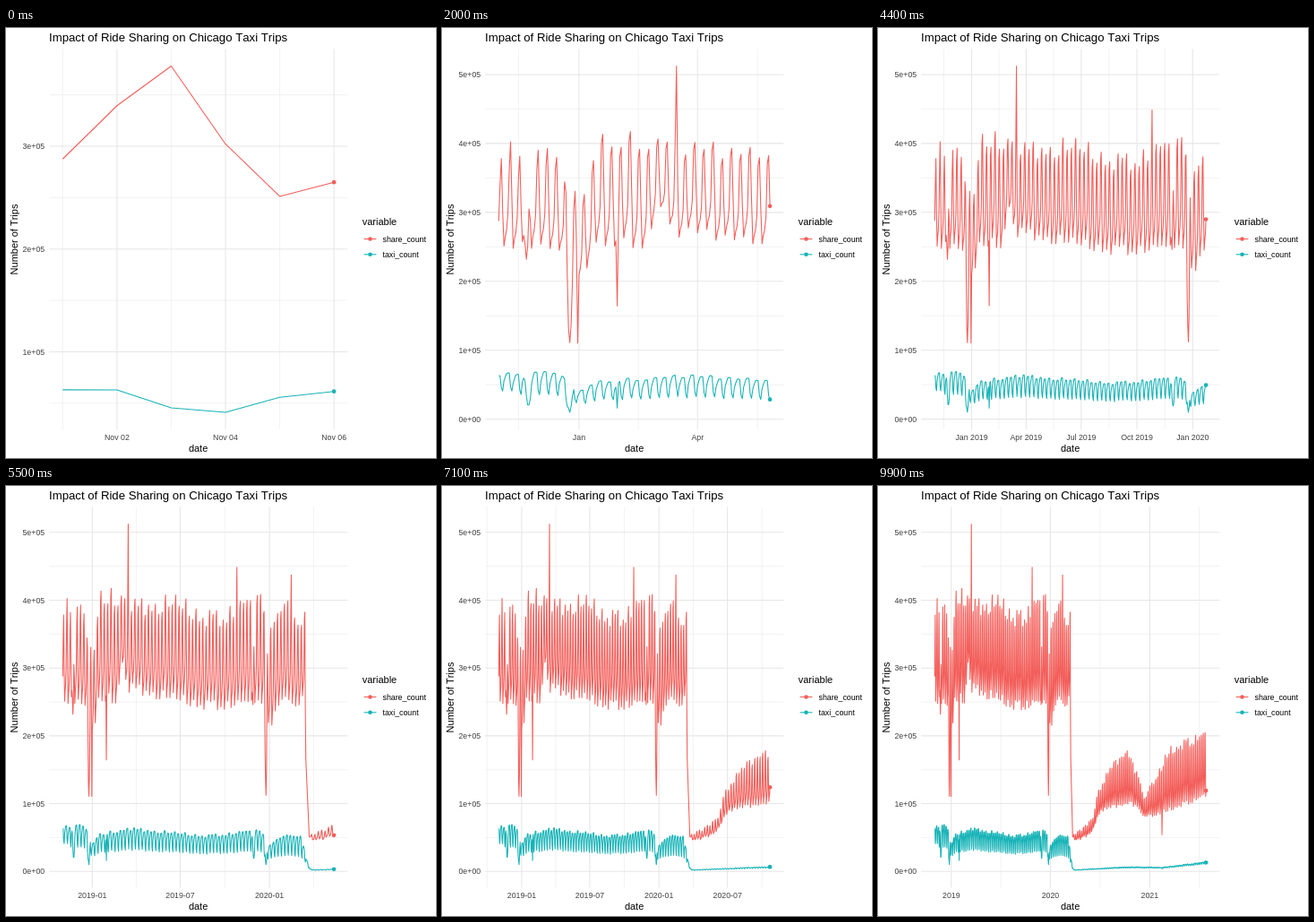
Recreate the animation shown at these times as an HTML page. Size 480 by 480 pixels, loop 10 s.

```html
<!DOCTYPE html>
<html lang="en">
<head>
<meta charset="utf-8">
<title>Ride sharing and taxi trips</title>
<style>
  html, body { margin: 0; width: 100%; height: 100%; overflow: hidden; background: #fff; }
  svg { display: block; width: 480px; height: 480px; }
  text { font: 11px "Liberation Sans", Arial, sans-serif; font-kerning: none; }
  .title { font-size: 13.2px; }
  .small, .tick { font-size: 8.8px; }
  .tick { fill: #404040; }
  .mid { text-anchor: middle; }
  .end { text-anchor: end; }
  .major, .minor { stroke: #e6e6e6; fill: none; stroke-width: 1.07; }
  .minor { stroke-width: .53; }
  .line { fill: none; stroke-width: 1.07; stroke-linejoin: round; }
  .share { stroke: #f35e5a; }
  .taxi { stroke: #17b3b7; }
  circle.share { fill: #f35e5a; stroke: none; }
  circle.taxi { fill: #17b3b7; stroke: none; }
</style>
</head>
<body>
<svg viewBox="0 0 480 480">
  <g id="grid"></g>
  <polyline id="shareLine" class="line share"/>
  <polyline id="taxiLine" class="line taxi"/>
  <circle id="shareDot" class="share" r="2.3"/>
  <circle id="taxiDot" class="taxi" r="2.3"/>
  <text class="title" x="48" y="15">Impact of Ride Sharing on Chicago Taxi Trips</text>
  <text class="mid" x="214.6" y="473">date</text>
  <text class="mid" transform="translate(13.2 236) rotate(-90)">Number of Trips</text>
  <text x="397.7" y="220">variable</text>
  <path class="line share" d="M399.6 235.5h13.8"/>
  <circle class="share" cx="406.5" cy="235.5" r="2.3"/>
  <text class="small" x="420.5" y="238.8">share_count</text>
  <path class="line taxi" d="M399.6 252.8h13.8"/>
  <circle class="taxi" cx="406.5" cy="252.8" r="2.3"/>
  <text class="small" x="420.5" y="256.1">taxi_count</text>
</svg>
<script>
const DAY = 864e5, START = Date.UTC(2018, 10, 1), LAST_DAY = 999;
const PANEL = { left: 48.2, right: 381.2, top: 23.2, bottom: 448.3 };
const PLOT = { left: 63.3, right: 366.1, top: 42.5, bottom: 429 };
const $ = id => document.getElementById(id);

// Piecewise linear curve through [day, value] pairs
function curve(keys, x) {
  let i = 1;
  while (i < keys.length - 1 && keys[i][0] < x) i++;
  const [a, u] = keys[i - 1], [b, v] = keys[i];
  return u + (v - u) * Math.min(1, Math.max(0, (x - a) / (b - a)));
}

// Trips in thousands; days count from Thursday, 1 November 2018.
// Each week swings between a low and a high level.
const SHARE_HIGH = [[5, 378], [9, 391], [128, 408], [150, 388], [230, 396], [310, 370], [420, 405], [499, 370],
  [501, 165], [508, 52], [548, 63], [585, 78], [597, 112], [640, 147], [710, 180], [775, 108],
  [842, 160], [862, 178], [981, 198]];
const SHARE_LOW = [[5, 245], [12, 255], [112, 256], [123, 312], [132, 272], [300, 245], [499, 252],
  [501, 165], [508, 50], [520, 45], [575, 55], [610, 90], [720, 103], [780, 80], [1000, 112]];
const TAXI_HIGH = [[0, 63], [20, 69], [45, 70], [75, 54], [134, 63], [300, 52], [400, 60], [440, 50],
  [490, 54], [504, 14], [510, 3.3], [520, 2.4], [700, 6.8], [840, 6.3], [1000, 14]];
const TAXI_LOW_RATIO = [[5, .643], [20, .52], [400, .5], [490, .42], [520, .7], [1000, .79]];

// Thursday to Wednesday, 0 = weekly low, 1 = weekly high
const SHARE_WEEK = [.32, .71, 1, .43, 0, .1, .16];
const TAXI_WEEK = [1, .98, .2, 0, .55, .78, .97];

// Holidays and weather as bell-shaped changes
const EVENTS = [
  { day: 22, share: -.32, taxi: -.7, width: 1.8 },
  { day: 54, share: -.55, taxi: -.8, width: 2.2 },
  { day: 60, share: -.45, taxi: 0, width: .5 },
  { day: 61, share: -.2, taxi: -.3, width: 9 },
  { day: 90, share: -.4, taxi: -.7, width: .6 },
  { day: 135, share: .263, taxi: .2, width: .6 },
  { day: 359, share: .173, taxi: 0, width: .6 },
  { day: 393, share: -.25, taxi: -.65, width: 1.8 },
  { day: 419, share: -.55, taxi: -.78, width: 2.2 },
  { day: 426, share: -.15, taxi: -.3, width: 9 },
  { day: 471, share: .13, taxi: .1, width: .6 },
  { day: 837, share: -.37, taxi: -.3, width: 1 }
];
const eventFactor = (name, d) =>
  EVENTS.reduce((f, e) => f * (1 + e[name] * Math.exp(-(((d - e.day) / e.width) ** 2))), 1);

const weekOf = d => Math.floor((d + 3) / 7);
const wobble = week => Math.sin(week * week);
const mix = (lo, hi, t) => lo + (hi - lo) * t;

function shareTrips(d) {
  const week = weekOf(d), weekday = d % 7;
  const lo = curve(SHARE_LOW, d) * (1 + .03 * wobble(week));
  const hi = curve(SHARE_HIGH, d) * (1 + .035 * wobble(week));
  const friday = weekday === 1 ? .2 * Math.min(1, week / 8) : 0;
  return mix(lo, hi, SHARE_WEEK[weekday] + friday) * eventFactor("share", d);
}
function taxiTrips(d) {
  const hi = curve(TAXI_HIGH, d) * (1 + .04 * wobble(weekOf(d)));
  return mix(hi * curve(TAXI_LOW_RATIO, d), hi, TAXI_WEEK[d % 7]) * eventFactor("taxi", d);
}
const days = Array.from({ length: LAST_DAY + 1 }, (_, d) => d);
const share = days.map(shareTrips), taxi = days.map(taxiTrips);

// Date breaks: about five steps that cover the visible range
const monthDay = (m, day = 1) => (Date.UTC(2018, m, day) - START) / DAY;
const MONTH = 365.2425 / 12;
const monthStep = (n, format) => ({ size: n * MONTH, format, at: i => monthDay(n * i) });
const STEPS = [
  { size: 1, format: "day", at: i => i - 31 },
  { size: 2, format: "day", at: i => 2 * i - 31 },
  { size: 7, format: "day", at: i => 7 * i - 73 },
  { size: MONTH / 2, format: "day", at: i => monthDay(i >> 1, i % 2 ? 15 : 1) },
  monthStep(1, "month"), monthStep(3, "month"), monthStep(6, "yearMonth"), monthStep(12, "year")
];

function cover(step, lo, hi) {
  const list = [];
  for (let i = 0; ; i++) {
    const d = step.at(i);
    if (d <= lo) list.length = 0;
    list.push(d);
    if (d >= hi) return list;
  }
}
function dateBreaks(lo, hi) {
  const goal = 5, miss = n => Math.abs(n - goal);
  let best = 0;
  STEPS.forEach((s, i) => {
    if (miss((hi - lo) / s.size) < miss((hi - lo) / STEPS[best].size)) best = i;
  });
  const first = cover(STEPS[best], lo, hi), n = first.length - 1;
  const next = STEPS[best + Math.sign(n - goal)];
  if (n !== goal && next) {
    const other = cover(next, lo, hi), m = other.length - 1;
    if (m >= goal / 2 && miss(m) < miss(n)) return { at: other, format: next.format };
  }
  return { at: first, format: STEPS[best].format };
}
function dateLabels({ at, format }) {
  const names = "Jan Feb Mar Apr May Jun Jul Aug Sep Oct Nov Dec".split(" ");
  const two = n => String(n).padStart(2, "0");
  const write = (d, f) => {
    const t = new Date(START + d * DAY), y = t.getUTCFullYear(), m = t.getUTCMonth();
    return { day: `${names[m]} ${two(t.getUTCDate())}`, month: names[m], monthYear: `${names[m]} ${y}`,
      yearMonth: `${y}-${two(m + 1)}`, year: `${y}` }[f];
  };
  const labels = at.map(d => write(d, format));
  const repeats = new Set(labels).size < labels.length;
  return format === "month" && repeats ? at.map(d => write(d, "monthYear")) : labels;
}

function draw(step) {
  const last = Math.min(LAST_DAY, Math.round(4.9 + 10.0798 * step));
  const shown = days.slice(0, last + 1);
  const seen = shown.flatMap(d => [share[d], taxi[d]]);
  const min = Math.min(...seen), max = Math.max(...seen), span = max - min;
  const x = d => PLOT.left + d / last * (PLOT.right - PLOT.left);
  const y = v => PLOT.bottom - (v - min) / span * (PLOT.bottom - PLOT.top);
  const vLine = px => `M${px.toFixed(2)} ${PANEL.top}V${PANEL.bottom}`;
  const hLine = py => `M${PANEL.left} ${py.toFixed(2)}H${PANEL.right}`;

  let minor = "", major = "", labels = "";
  const lo = -.05 * last, hi = 1.05 * last;
  const breaks = dateBreaks(lo, hi), names = dateLabels(breaks);
  const inside = d => d >= lo && d <= hi;
  breaks.at.forEach((d, i) => {
    const half = (d + breaks.at[i + 1]) / 2;
    if (inside(half)) minor += vLine(x(half));
    if (!inside(d)) return;
    major += vLine(x(d));
    labels += `<text class="tick mid" x="${x(d).toFixed(2)}" y="460">${names[i]}</text>`;
  });
  for (let v = 0; v <= max + .05 * span; v += 50) {
    if (v < min - .05 * span) continue;
    if (v % 100) { minor += hLine(y(v)); continue; }
    major += hLine(y(v));
    labels += `<text class="tick end" x="43.2" y="${(y(v) + 3.2).toFixed(2)}">${v / 100}e+0${v ? 5 : 0}</text>`;
  }
  $("grid").innerHTML = `<path class="minor" d="${minor}"/><path class="major" d="${major}"/>${labels}`;

  for (const [name, data] of [["share", share], ["taxi", taxi]]) {
    $(name + "Line").setAttribute("points", shown.map(d => `${x(d).toFixed(2)},${y(data[d]).toFixed(2)}`).join(" "));
    $(name + "Dot").setAttribute("cx", x(last));
    $(name + "Dot").setAttribute("cy", y(data[last]));
  }
}

let current = -1;
function tick() {
  const step = Math.floor(performance.now() % 10000 / 100);
  if (step !== current) draw(current = step);
  requestAnimationFrame(tick);
}
tick();
</script>
</body>
</html>
```
